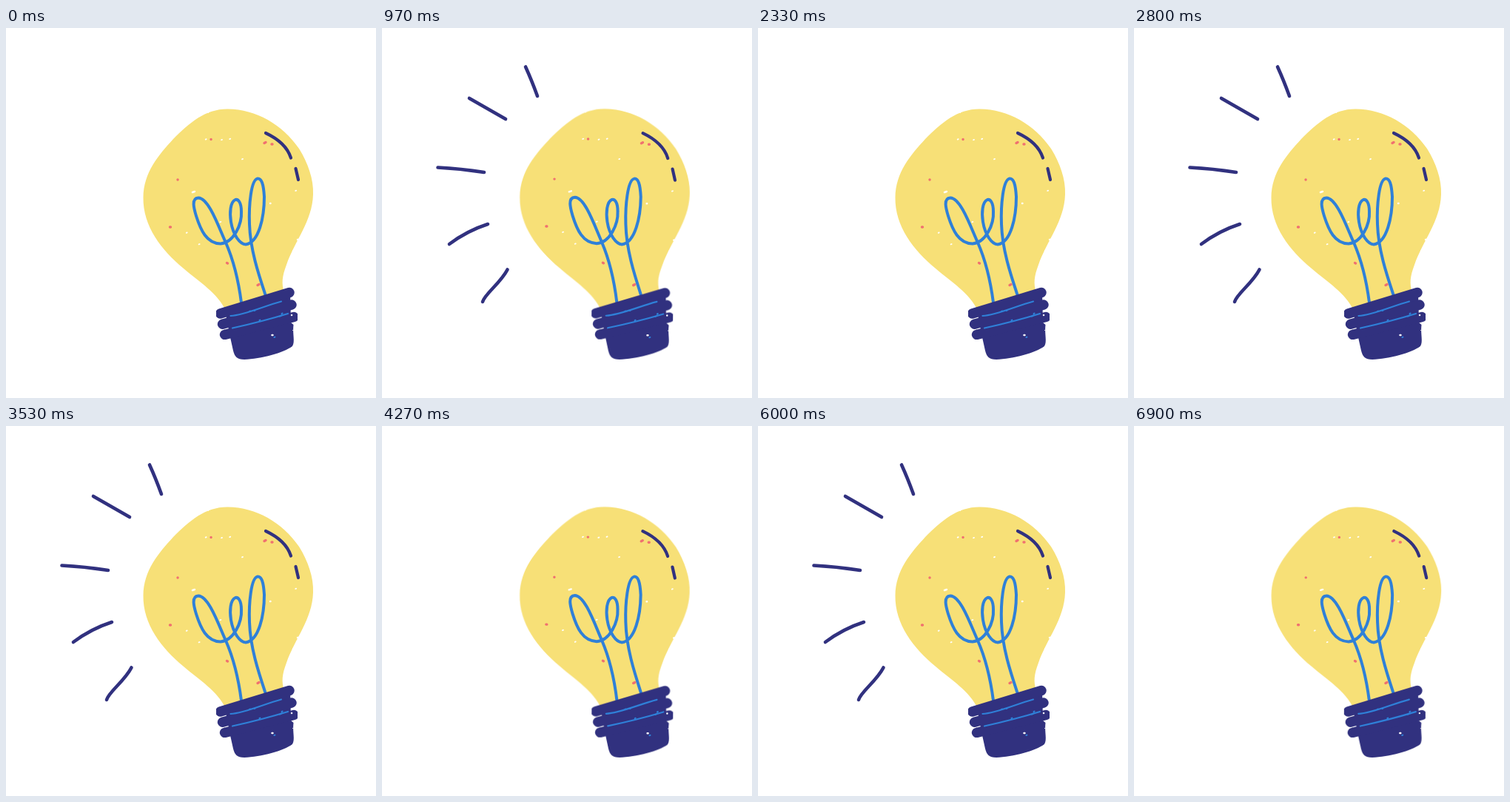
Animation of 500x500 px, one loop 6.93 s. Source, as an HTML page:

```html
<!DOCTYPE html>
<html lang="en">
<head>
<meta charset="utf-8">
<title>Light bulb</title>
<style>
  html, body { margin: 0; width: 100%; height: 100%; overflow: hidden; background: #fff; }
  svg { display: block; width: 100vw; height: 100vh; }
  .line { fill: none; stroke-linecap: round; stroke-linejoin: round; }
  .navy { stroke: #31317f; }
  .blue { stroke: #2f80d8; }
  .pink { stroke: #f0716f; }
  .white { stroke: #fff; }
</style>
</head>
<body>
<svg viewBox="0 0 500 500">
  <defs>
    <filter id="rough" x="-5%" y="-5%" width="110%" height="110%" color-interpolation-filters="sRGB">
      <feTurbulence type="fractalNoise" baseFrequency=".3" numOctaves="2" seed="4"/>
      <feDisplacementMap in="SourceGraphic" scale="1.5" xChannelSelector="R" yChannelSelector="G"/>
    </filter>
  </defs>

  <g id="rays" class="line navy" stroke-width="4.6">
    <path d="M194 52.5 Q202 70 210 92"/>
    <path d="M118 95 L167 123"/>
    <path d="M75.5 188.5 Q107 190 138 195"/>
    <path d="M91 292 Q115 274 143 265"/>
    <path d="M136 370 C139 359 160 345 169.5 326.5"/>
  </g>

  <g id="bulb">
    <path filter="url(#rough)" fill="#f7e077" d="M300 109.5 C338 110 373 130 396 163
      C408 182 416 205 415 225 C414 261 390 288 379 320 C373 336 372 345 376 358 L297 382
      C286 358 262 344 240 325 C210 300 185 268 185.5 229 C186 195 206 172 226 150
      C248 128 270 109 300 109.5Z"/>
    <path class="line blue" stroke-width="4" d="M318 371 C315 348 308 315 297 290
      C287 268 274 230 260 229.5 C250 230 254 244 257 254 C263 273 271 291 290 291.5
      C308 290 319 265 318 248 C318 236 314 231 310 232 C303 235 302 250 304 262
      C307 280 316 292 324 292.5 C342 290 349 255 349 228 C348 210 345 203 340 203.5
      C331 205 328 240 329 265 C330 300 342 335 351 362"/>
    <path class="line navy" stroke-width="4.2" d="M351 142 C366 149 380 160 385 175.5 M391.5 190 L395 205"/>
    <path class="line pink" stroke-width="3.4" d="M277 150.5h.1 M232 205h.1 M221.5 269h1
      M349 155.5l2 -1 M359 157h1 M298.5 317.5l1 .5 M340 347.5l2 -1"/>
    <g filter="url(#rough)">
      <path fill="#31317f" d="M296 382 L384 355 L385 398 L388.5 401 C387 414 391 424 387 430
        C375 439 345 447 322 448 C312 448 309 444 307 436 L303 418Z"/>
      <path id="ridges" class="line navy" stroke-width="13.4"/>
    </g>
    <path class="line blue" stroke-width="2.2" d="M303.5 389 C322 388 348 376 372 369.5 M306 405.5 Q345 397 381 386"/>
    <path id="whiteFlecks" class="line white" stroke-width="1.8"/>
    <path id="blueFlecks" class="line blue" stroke-width="2"/>
    <path class="line white" stroke-width="2.4" d="M252 222l3 -1 M357 237h.5 M394 286h1.5 M359.5 415h1 M386 388h.1"/>
  </g>
</svg>
<script>
const $ = id => document.getElementById(id);
const LOOP = 6930, CYCLE = 29;

let seed = 7;
function random() {
  seed = seed * 16807 % 2147483647;
  return seed / 2147483647;
}

// Short tilted dabs spread over an ellipse
function scatter(id, count, x, y, rx, ry) {
  let d = "";
  for (let i = 0; i < count; i++) {
    const angle = random() * 2 * Math.PI, r = Math.sqrt(random());
    d += `M${x + rx * r * Math.cos(angle)} ${y + ry * r * Math.sin(angle)}l1 -.4`;
  }
  $(id).setAttribute("d", d);
}
scatter("whiteFlecks", 8, 300, 220, 95, 95);
scatter("blueFlecks", 7, 345, 402, 34, 32);

let ridges = "";
for (let i = 0; i < 3; i++)
  ridges += `M${289.5 + 3 * i} ${386 + 14.2 * i}L${383 + 3 * i} ${357.5 + 16.5 * i}`;
$("ridges").setAttribute("d", ridges);

// A shake that swells and dies away while the cycle runs from step 6 to its end
function tilt(step) {
  const swell = Math.sin(Math.PI * Math.max(0, step - 6) / (CYCLE - 6));
  return .75 * swell * Math.cos(step * Math.PI / 2);
}

function draw(now) {
  // Drawings change every 80 ms, shown on a 30 per second grid
  const tick = Math.floor((now % LOOP + 4) * .03);
  const step = Math.floor(tick * 5 / 12) % CYCLE;
  $("bulb").setAttribute("transform", `rotate(${tilt(step)} 328 305)`);
  $("rays").style.display = step >= 3 && step < 21 ? "" : "none";
}

const start = performance.now();
function loop() {
  draw(performance.now() - start);
  requestAnimationFrame(loop);
}
loop();
</script>
</body>
</html>
```
